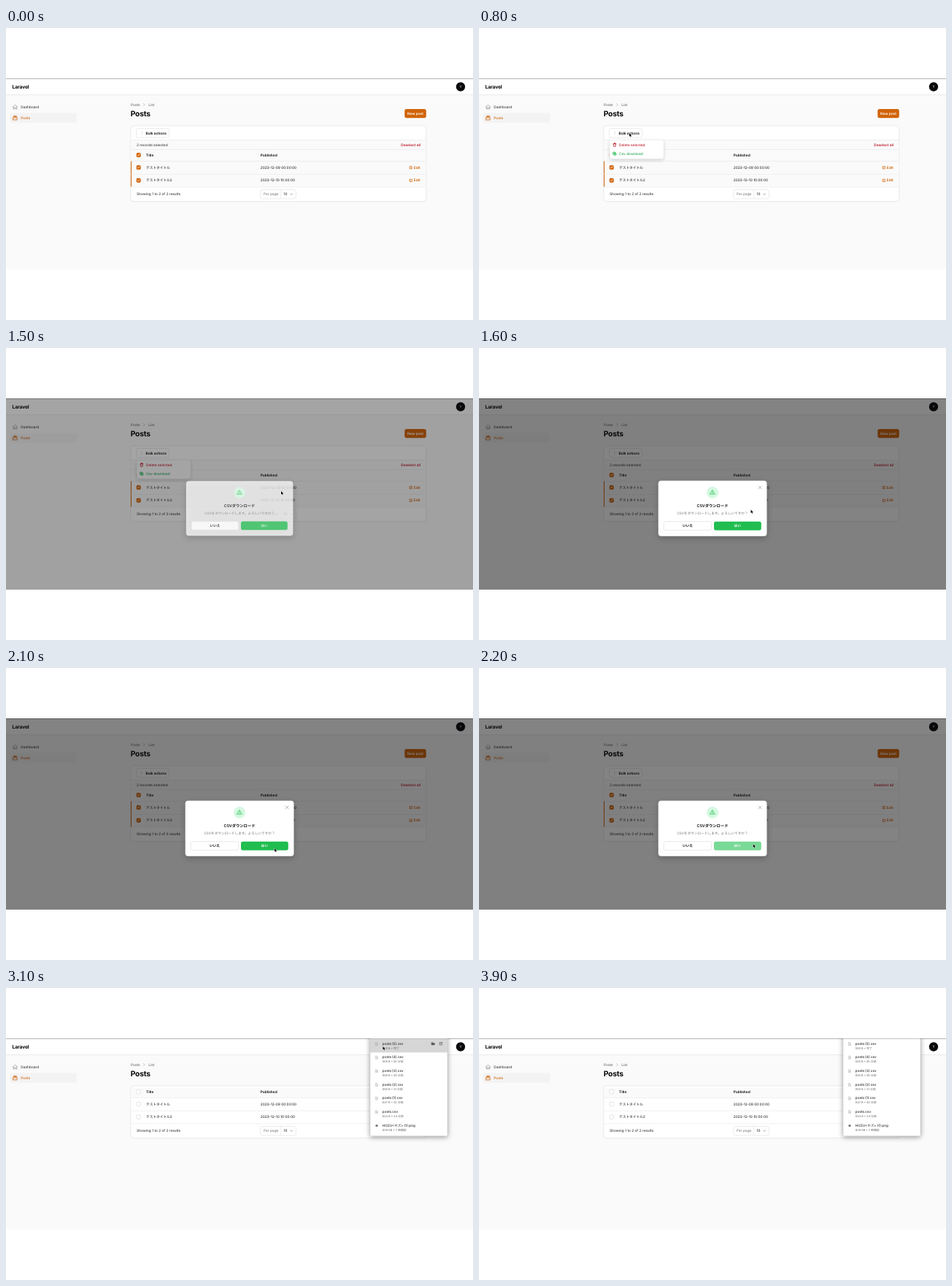
An HTML page with a canvas that plays this animation: 640x400 px, repeating every 4000 ms.

```html
<!DOCTYPE html>
<html lang="ja">
<head>
<meta charset="utf-8">
<style>
  html, body { margin: 0; width: 640px; height: 400px; overflow: hidden; background: #fff; }
  canvas { display: block; }
</style>
</head>
<body>
<canvas id="stage" width="640" height="400"></canvas>
<script>
const ctx = document.getElementById('stage').getContext('2d');
const LOOP = 4000, STEP = 100;
const FONT = 'Inter, "Noto Sans CJK JP", "Noto Sans CJK", sans-serif';
const INK = '#09090b', MUTED = '#71717a', LINE = '#e7e7e9', SOFT = '#fafafa';
const ORANGE = '#d06409', RED = '#be1c2c', GREEN = '#20bd50';

const posts = [
  ['テストタイトル', '2023-12-09 00:00:00'],
  ['テストタイトル2', '2023-12-10 10:00:00']
];
const downloads = [
  ['posts (5).csv', '508 B • 完了'],
  ['posts (4).csv', '508 B • 25 分前'],
  ['posts (3).csv', '658 B • 28 分前'],
  ['posts (2).csv', '658 B • 31 分前'],
  ['posts (1).csv', '647 B • 32 分前'],
  ['posts.csv', '624 B • 34 分前'],
  ['HOZU<ホズ> (1).png', '809 KB • 7 時間前']
];

// Cursor tip: time, x, y
const cursorKeys = [
  [100, 330, 288], [600, 206, 144], [900, 206, 144], [1200, 206, 172],
  [1400, 206, 172], [1500, 377, 196], [1700, 368, 247], [2100, 368, 247],
  [2300, 383.5, 235.5], [2500, 425, 196], [3000, 516.5, 80], [3500, 516.5, 80]
];

// y is the middle of the capitals
function text(str, x, y, size = 4.8, weight = 400, color = INK, align = 'left', spacing = 0) {
  ctx.font = `${weight} ${size}px ${FONT}`;
  ctx.textAlign = align;
  ctx.letterSpacing = spacing + 'px';
  ctx.fillStyle = color;
  ctx.fillText(str, x, y + size * 0.36);
}

function rect(x, y, w, h, color) {
  ctx.fillStyle = color;
  ctx.fillRect(x, y, w, h);
}

function box(x, y, w, h, r, fill, stroke, shadow) {
  ctx.save();
  ctx.beginPath();
  ctx.roundRect(x, y, w, h, r);
  if (shadow) {
    ctx.shadowColor = `rgba(0,0,0,${shadow[0]})`;
    ctx.shadowBlur = shadow[1];
    ctx.shadowOffsetY = shadow[2];
  }
  ctx.fillStyle = fill;
  ctx.fill();
  ctx.shadowColor = 'transparent';
  if (stroke) {
    ctx.strokeStyle = stroke;
    ctx.lineWidth = 0.6;
    ctx.stroke();
  }
  ctx.restore();
}

function disc(x, y, r, color) {
  ctx.beginPath();
  ctx.arc(x, y, r, 0, Math.PI * 2);
  ctx.fillStyle = color;
  ctx.fill();
}

// Line icon on paths relative to its centre
function icon(x, y, path, color, width = 0.6, filled = false) {
  ctx.save();
  ctx.translate(x, y);
  const shape = new Path2D(path);
  ctx.lineWidth = width;
  ctx.lineCap = ctx.lineJoin = 'round';
  ctx.strokeStyle = ctx.fillStyle = color;
  if (filled) ctx.fill(shape);
  ctx.stroke(shape);
  ctx.restore();
}

const icons = {
  home: 'M-3.2 0L0-3.1L3.2 0M-2.3-.8V2.8H-.8V.7H.8V2.8H2.3V-.8',
  stack: 'M-2.7-.4H2.7V2.7H-2.7ZM-2.3-1.6H2.3M-1.7-2.8H1.7',
  right: 'M-.8-1.5L.8 0L-.8 1.5',
  down: 'M-1.5-.8L0 .8L1.5-.8',
  check: 'M-1.4 .1L-.4 1.1L1.4-1.2',
  edit: 'M.2-1.5H-1.8V1.8H1.5V-.1M-.5 .5L1.7-1.9',
  trash: 'M-1.4-1.2H1.4L1.1 2.2H-1.1ZM-1.9-1.6H1.9M-.6-2.2H.6',
  copy: 'M-1.9-1.9H.5V1H-1.9ZM-.6-.7H1.9V2.2H-.6Z',
  warning: 'M0-2.8L3.3 2.6H-3.3ZM0-.8V.7M0 1.6V1.7',
  close: 'M-2-2L2 2M2-2L-2 2',
  doc: 'M-1.3-2H.6L1.4-1.2V2H-1.3ZM-.6-.3H.6M-.6 .7H.6',
  folder: 'M-2-1.5H-.4L.2-.9H2V1.6H-2Z',
  open: 'M-.2-1.7H-1.7V1.7H1.7V.2M.6-1.8H1.8V-.6M1.7-1.7L-.5 .5'
};

function drawShell() {
  rect(0, 0, 640, 400, '#fff');
  rect(0, 69, 640, 262, SOFT);
  rect(0, 69, 640, 23, '#fff');
  rect(0, 69, 640, 1, '#b4b4b4');
  rect(0, 91, 640, 0.7, '#e4e4e6');
  text('Laravel', 8.5, 80.5, 6.8, 700, INK, 'left', -0.16);
  disc(623, 80.5, 6.2, INK);
  text('Y', 623, 80.5, 4.6, 400, '#fff', 'center');

  icon(12.5, 108.3, icons.home, '#85858d');
  text('Dashboard', 20.3, 108.3, 4.8, 500, '#3f3f46');
  box(5.5, 116.5, 91.5, 13.2, 2.5, '#f3f3f4');
  icon(12.5, 123.2, icons.stack, ORANGE, 0.8);
  text('Posts', 20.3, 123.2, 4.8, 500, ORANGE);

  text('Posts', 171, 105, 4.8, 500, MUTED);
  icon(189.3, 105, icons.right, '#a1a1aa');
  text('List', 195.3, 105, 4.8, 500, MUTED);
  text('Posts', 170.7, 117.4, 10.3, 700, INK, 'left', -0.2);
  box(546.3, 111, 29.5, 12.2, 2.6, ORANGE);
  text('New post', 561, 117.2, 4.8, 600, '#fff', 'center');
}

function checkbox(y, on) {
  box(179, y - 2.7, 5.4, 5.4, 1.3, on ? ORANGE : '#fff', on ? ORANGE : '#d4d4d8');
  if (on) icon(181.7, y, icons.check, '#fff', 0.8);
}

function drawTable(selected) {
  const top = selected ? 166 : 134;
  const bottom = top + 71.6;
  box(171, 134, 404.7, bottom - 134, 4, '#fff', '#e2e2e5', [0.06, 2, 0.5]);
  if (selected) {
    box(178.5, 137.5, 45, 12.6, 2.6, '#fff', '#dedee1');
    for (const dy of [-1.6, 0, 1.6]) disc(186, 143.8 + dy, 0.4, '#85858d');
    text('Bulk actions', 191.5, 143.8, 4.8, 600);
    rect(171.3, 153.5, 404.1, 12.5, SOFT);
    rect(171.3, 153.3, 404.1, 0.6, LINE);
    text('2 records selected', 179, 160, 4.8, 500, '#3f3f46');
    text('Deselect all', 568, 160, 4.8, 600, RED, 'right');
  }
  rect(171.3, top + (selected ? 0 : 3), 404.1, selected ? 16 : 13, SOFT);
  if (selected) rect(171.3, top, 404.1, 0.6, LINE);
  checkbox(top + 8, selected);
  text('Title', 192, top + 8, 4.8, 600);
  text('Published', 348.7, top + 8, 4.8, 600);

  posts.forEach(([title, date], i) => {
    const y = top + 16.2 + i * 17.7, mid = y + 8.8;
    if (selected) {
      rect(171.3, y, 404.1, 17.7, SOFT);
      rect(171, y, 1, 17.7, ORANGE);
    }
    rect(171.3, y, 404.1, 0.6, LINE);
    checkbox(mid, selected);
    text(title, 192, mid, 4.7);
    text(date, 348.7, mid, 4.8);
    icon(555, mid, icons.edit, ORANGE, 0.7);
    text('Edit', 567.7, mid, 4.8, 600, ORANGE, 'right');
  });

  rect(171.3, top + 51.6, 404.1, 0.6, LINE);
  const foot = top + 61.7;
  text('Showing 1 to 2 of 2 results', 179, foot, 4.8, 500, '#3f3f46');
  box(348.7, foot - 6.2, 48.6, 12.4, 2.6, '#fff', '#dedee1');
  rect(376.6, foot - 6.2, 0.6, 12.4, '#dedee1');
  text('Per page', 353, foot, 4.8, 400, MUTED);
  text('10', 380.5, foot, 4.8);
  icon(391.3, foot, icons.down, MUTED);
}

function drawMenu(loading) {
  box(179, 153.2, 74.2, 26, 2.6, '#fff', '#e8e8ea', [0.16, 5, 2]);
  icon(186, 160, icons.trash, RED, 0.8);
  text('Delete selected', 192, 160, 4.8, 500, RED);
  ctx.save();
  if (loading) ctx.globalAlpha = 0.6;
  icon(186, 172, icons.copy, GREEN, 0.8);
  text('Csv download', 192, 172, 4.8, 500, '#22a852');
  ctx.restore();
}

function drawModal(progress, busy) {
  rect(0, 69, 640, 262, `rgba(9,9,11,${0.5 * progress})`);
  const opening = progress < 1;
  const zoom = opening ? 0.985 : 1;
  ctx.save();
  ctx.globalAlpha = opening ? 0.75 : 1;
  ctx.translate(320, 219.8);
  ctx.scale(zoom, zoom);
  ctx.translate(-320, -219.8);
  box(245.7, 181.7, 148.8, 76, 4, '#fff', null, [0.22, 8, 3]);
  disc(320, 197.9, 8, '#d5f8e1');
  icon(320, 197.6, icons.warning, GREEN, 0.7);
  if (!opening) icon(385.3, 191, icons.close, '#94949b', 0.7);
  text('CSVダウンロード', 320, 216.2, 5.3, 600, INK, 'center');
  text('CSVをダウンロードします。よろしいですか？', 320, 226.2, 4.65, 400, MUTED, 'center');
  box(253.2, 237.7, 65.5, 12, 2.6, '#fff', '#dadade');
  text('いいえ', 286, 243.6, 4.7, 600, INK, 'center');
  box(322, 237.7, 64.8, 12, 2.6, busy ? '#79d996' : GREEN);
  text('はい', 354.3, 243.6, 4.7, 600, '#fff', 'center');
  ctx.restore();
}

function drawDownloads(hover) {
  ctx.save();
  ctx.beginPath();
  ctx.rect(0, 69, 640, 262);
  ctx.clip();
  box(499, 60, 106, 142.8, 1.5, '#fff', '#d0d0d0', [0.42, 7, 1.5]);
  if (hover) {
    rect(499, 69, 106, 19.3, '#d6d6d6');
    icon(585.3, 76.3, icons.folder, '#55565a', 0.5, true);
    icon(595.8, 76.3, icons.open, '#55565a', 0.6);
  }
  rect(499, 69, 106, 0.8, '#b4b4b4');
  downloads.forEach(([name, info], i) => {
    const y = 76 + i * 18.65;
    const image = name.endsWith('.png');
    if (image) disc(508, y + 0.7, 1.7, '#77787c');
    else icon(508, y + 0.5, icons.doc, '#a4a5a9', 0.5);
    text(name, 515.8, y, 4.6, 500, '#29292c');
    text(info, 515.8, y + 6.4, 3.9, 400, '#626368');
  });
  ctx.restore();
}

function drawCursor(t) {
  const next = cursorKeys.findIndex(key => key[0] >= t);
  if (next < 0 || t < cursorKeys[0][0]) return;
  const [t1, x1, y1] = cursorKeys[next];
  const [t0, x0, y0] = cursorKeys[Math.max(0, next - 1)];
  const k = t1 === t0 ? 1 : (t - t0) / (t1 - t0);
  const ease = k * k * (3 - 2 * k);
  ctx.save();
  ctx.translate(x0 + (x1 - x0) * ease, y0 + (y1 - y0) * ease);
  const arrow = new Path2D('M0 0V4.6L1.1 3.7L1.8 5.3L2.6 5L1.9 3.4H3.3Z');
  ctx.strokeStyle = '#fff';
  ctx.lineWidth = 0.8;
  ctx.stroke(arrow);
  ctx.fillStyle = '#000';
  ctx.fill(arrow);
  ctx.restore();
}

function draw(t) {
  const done = t >= 2300;
  drawShell();
  drawTable(!done);
  if (t >= 800 && t < 1600) drawMenu(t === 1400);
  if (t >= 1500 && !done) drawModal(t === 1500 ? 0.74 : 1, t === 2200);
  if (done) drawDownloads(t >= 3000 && t < 3600);
  drawCursor(t);
}

const start = performance.now();
function tick() {
  const elapsed = (performance.now() - start) % LOOP;
  ctx.textRendering = 'geometricPrecision';
  draw(Math.floor(elapsed / STEP) * STEP);
  requestAnimationFrame(tick);
}
tick();
</script>
</body>
</html>
```
